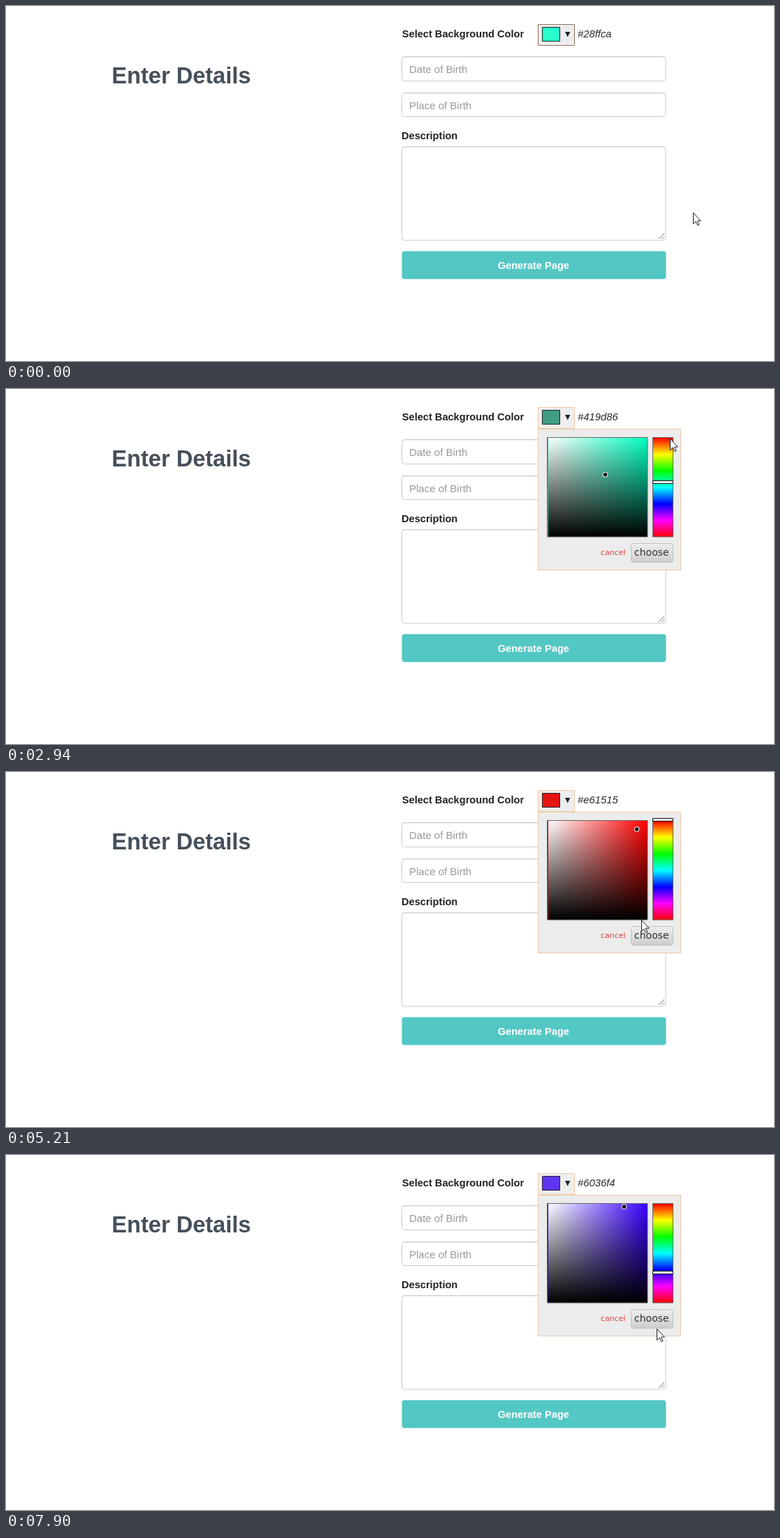
Write an HTML page with a canvas that moves like this. It is 1099 px wide and 509 px high and loops after 8 s.

```html
<!DOCTYPE html>
<html lang="en">
<head>
<meta charset="utf-8">
<title>Colour picker form</title>
<style>
html, body { margin: 0; width: 100%; height: 100%; overflow: hidden; background: #fff; }
canvas { display: block; }
</style>
</head>
<body>
<canvas id="stage" width="1099" height="509"></canvas>
<script>
const ctx = document.getElementById('stage').getContext('2d');
const LOOP = 8000;
const SANS = '"Liberation Sans", Arial, sans-serif';
const BOLD = 'bold 14.6px ' + SANS;
const DEJAVU = '"DejaVu Sans", sans-serif';

// Places the pointer visits: arrival time, x, y
const stops = [
  [0, 983, 296], [580, 791, 216], [1130, 770, 69], [1440, 791, 43],
  [2222, 865, 124], [2620, 925, 89], [2940, 952, 69], [3250, 903, 82],
  [3720, 931, 235], [4410, 791, 43], [5270, 931, 243], [5575, 914, 151],
  [5885, 937, 157], [6200, 939, 169], [6430, 886, 75], [6730, 912, 198],
  [7690, 925, 288], [7838, 931, 249]
];

// Colour in effect from each time on
const picks = [
  [0, '#28ffca'], [2220, '#419d86'], [2945, '#9d4141'], [3250, '#e61515'],
  [5575, '#6a0101'], [6270, '#18016a'], [6420, '#6036f4']
];

const arrow = new Path2D('M.5 .5V16.5L4.2 13L6.8 18.5L9 17.5L6.5 12H11.3Z');
const hand = new Path2D('M-1.5 13V2a1.7 1.7 0 0 1 3.4 0v6c1-1 3-.8 3.3.6 1-.8 2.7-.5 3 .8 ' +
  '1.2-.6 2.8 0 2.8 1.8v4.5c0 3-1.5 4-2 6.8h-8c-1-3-4-5-6-9-.8-2 1-3 2.2-2z');
const knuckles = new Path2D('M1.9 8v4M5.2 8.6v3.4M8.2 9.4v3');
const beam = new Path2D('M-3 -7.5h2.5l.5 .5l.5 -.5h2.5M0 -7V7M-3 7.5h2.5l.5 -.5l.5 .5h2.5');

const inside = (p, l, t, r, b) => p.x >= l && p.x < r && p.y >= t && p.y < b;

// The pointer was sampled every 78 ms; each trip takes longer the farther it goes.
function pointerAt(time) {
  const t = Math.floor((time - 38) / 78) * 78 + 38;
  let [leave, x, y] = stops[0];
  for (const [arrive, toX, toY] of stops) {
    const start = Math.max(leave, arrive - 150 - 1.6 * Math.hypot(toX - x, toY - y));
    if (t < start) break;
    const f = Math.min(1, (t - start) / (arrive - start || 1));
    x = Math.round(x + (toX - x) * f);
    y = Math.round(y + (toY - y) * f);
    if (f < 1) break;
    leave = arrive;
  }
  return { x, y };
}

function toHsv(hex) {
  const [r, g, b] = [1, 3, 5].map(i => parseInt(hex.slice(i, i + 2), 16));
  const max = Math.max(r, g, b), d = max - Math.min(r, g, b);
  const sector = max === r ? (g - b) / d : max === g ? 2 + (b - r) / d : 4 + (r - g) / d;
  return { h: sector * 60, s: d / max, v: max / 255 };
}

function text(str, x, y, font, color) {
  ctx.font = font;
  ctx.fillStyle = color;
  ctx.fillText(str, x, y);
}

function box(x, y, w, h, fill, stroke, radius = 0, line = 1) {
  ctx.beginPath();
  ctx.roundRect(x, y, w, h, radius);
  if (fill) { ctx.fillStyle = fill; ctx.fill(); }
  if (stroke) { ctx.strokeStyle = stroke; ctx.lineWidth = line; ctx.stroke(); }
}

function gradient(x0, y0, x1, y1, ...colors) {
  const g = ctx.createLinearGradient(x0, y0, x1, y1);
  colors.forEach((c, i) => g.addColorStop(i / (colors.length - 1), c));
  return g;
}

function field(y, h, placeholder) {
  box(566.5, y + .5, 377.5, h - 1, '#fff', '#ccc', 4);
  ctx.fillStyle = 'rgba(0,0,0,.07)';
  ctx.fillRect(568, y + 1, 375, 1);
  if (placeholder) text(placeholder, 577, y + 23.5, '15px ' + SANS, '#999');
}

function drawForm() {
  ctx.fillStyle = '#fff';
  ctx.fillRect(0, 0, 1099, 509);
  text('Enter Details', 151.3, 111, 'bold 32.6px ' + SANS, '#45505a');
  text('Select Background Color', 566.8, 45, BOLD, '#222');
  field(72, 36, 'Date of Birth');
  field(124, 35, 'Place of Birth');
  text('Description', 566, 191, BOLD, '#222');
  field(201, 135.5);
  ctx.strokeStyle = '#777';
  ctx.lineWidth = 1;
  ctx.stroke(new Path2D('M934 334L942 326M938.5 334L942 330.5'));
  box(566.5, 351.5, 378, 40, '#53c7c4', null, 4);
  text('Generate Page', 703.7, 377, BOLD, '#fff');
}

function drawSwatch(color, active) {
  box(761.5, 26.5, 52, 30, '#eee', active ? '#f0c8a4' : '#94705c');
  box(767.5, 30.5, 25, 20, color, '#222');
  ctx.fillStyle = '#222';
  ctx.fill(new Path2D('M800 37H807.4L803.7 44.5Z'));
  text(color, 818, 45, 'italic 14.8px ' + SANS, '#2a2a2a');
}

function drawPicker(hue, dot, sliderY, pressed) {
  box(761.5, 57.5, 204, 202, '#ececec', '#ecc9a8');

  // The plain hue shows through as a thin line at the left edge.
  box(774.5, 69.5, 143.5, 142.5, `hsl(${hue} 100% 40%)`);
  box(776, 70, 142, 142, `hsl(${hue} 100% 50%)`);
  box(776, 70, 142, 142, gradient(776, 0, 918, 0, '#fff', 'rgba(255,255,255,0)'));
  box(776, 70, 142, 142, gradient(0, 70, 0, 212, 'rgba(0,0,0,0)', '#000'));
  box(774.5, 69.5, 143.5, 142.5, null, '#666');
  for (const [r, c] of [[3.8, '#fff'], [2.8, '#000']]) {
    ctx.beginPath();
    ctx.arc(dot.x, dot.y, r, 0, 7);
    ctx.fillStyle = c;
    ctx.fill();
  }

  box(925.5, 69.5, 29, 142.5,
    gradient(0, 70, 0, 212, '#f00', '#ff0', '#0f0', '#0ff', '#00f', '#f0f', '#f00'), '#666');
  box(925.5, sliderY - 2, 29, 4, '#f4f4f4', '#111');

  text('cancel', 851, 238, '11px ' + DEJAVU, '#d93f3f');
  const face = pressed ? ['#aaa', '#c8c8c8', '#b8b8b8'] : ['#eee', '#ccc'];
  box(894.5, 221.5, 60, 27, gradient(0, 221, 0, 249, ...face), '#c2c2c2', 3);
  if (pressed) box(895, 222, 59, 26, null, '#000', 3, 2);
  text('choose', 899, 239, '14px ' + DEJAVU, '#333');
}

function drawPointer(p, open, dot, sliderY) {
  const inPicker = open && inside(p, 761, 57, 966, 260);
  const overLink = inside(p, 761, 26, 814, 57) || inPicker && (
    inside(p, 894, 221, 955, 249) || Math.hypot(p.x - dot.x, p.y - dot.y) < 10 ||
    inside(p, 925, sliderY - 3, 955, sliderY + 3));
  const overField = !inPicker && [[72, 108], [124, 159], [201, 336]]
    .some(([top, bottom]) => inside(p, 566, top, 945, bottom));
  const shape = overLink ? hand : overField ? beam : arrow;
  ctx.save();
  ctx.translate(p.x, p.y);
  ctx.lineWidth = 1;
  ctx.strokeStyle = '#1c1c28';
  ctx.fillStyle = '#fff';
  if (shape !== beam) ctx.fill(shape);
  ctx.stroke(shape);
  if (shape === hand) ctx.stroke(knuckles);
  ctx.restore();
}

function frame() {
  const t = performance.now() % LOOP;
  const color = picks.filter(([start]) => start <= t).pop()[1];
  const { h, s, v } = toHsv(color);
  const dot = { x: 775.5 + 140 * s, y: 68 + 142.3 * (1 - v) };
  const sliderY = Math.round(67.5 + h / 360 * 143) + .5;
  const open = t >= 1690 && t < 3870 || t >= 4510;
  const pointer = pointerAt(t);

  drawForm();
  drawSwatch(color, open || inside(pointer, 761, 26, 814, 57));
  if (open) drawPicker(h, dot, sliderY, t >= 3790 && t < 3870);
  drawPointer(pointer, open, dot, sliderY);
  requestAnimationFrame(frame);
}
frame();
</script>
</body>
</html>
```
